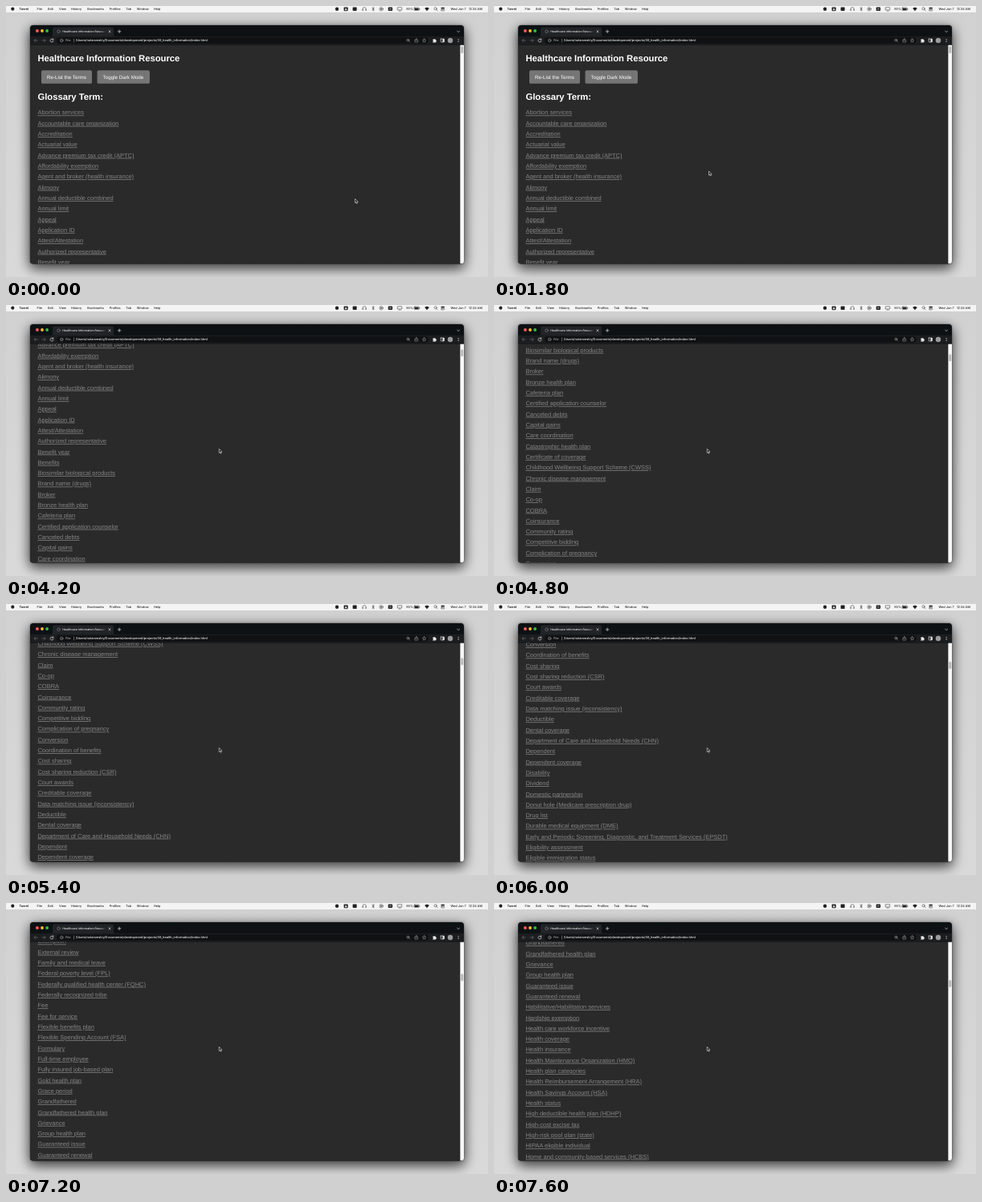
Animation of 600 by 338 pixels, one loop 8000 ms. Source, as an HTML page:

```html
<!DOCTYPE html>
<html lang="en">
<head>
<meta charset="utf-8">
<title>Healthcare Information Resource</title>
<style>
  html, body { margin: 0; width: 100%; height: 100%; overflow: hidden; background: #d3d3d3; }
  svg { display: block; width: 100vw; height: 100vh; text-rendering: geometricPrecision; }
  .ui { font: 500 3.8px Inter, Roboto, sans-serif; }
  .page { font: 7.5px "Liberation Sans", Arial, sans-serif; }
  .page .heading { font-weight: bold; font-size: 11.25px; fill: #fff; }
  .page .button { font-size: 6.25px; fill: #fff; }
  .term { fill: #858585; text-decoration: underline; }
  .line { fill: none; stroke-width: .7; stroke-linecap: round; stroke-linejoin: round; }
</style>
</head>
<body>
<svg viewBox="0 0 600 338" xmlns="http://www.w3.org/2000/svg">
  <defs>
    <linearGradient id="wall" x2="0" y2="1">
      <stop stop-color="#d1d1d1"/><stop offset="1" stop-color="#d9d9d9"/>
    </linearGradient>
    <linearGradient id="fade" gradientUnits="userSpaceOnUse" x1="116" x2="125">
      <stop stop-color="#e6e6e6"/><stop offset="1" stop-color="#e6e6e6" stop-opacity="0"/>
    </linearGradient>
    <clipPath id="view"><path d="M30 48.5H570V318a3.5 3.5 0 0 1-3.5 3.5H33.5A3.5 3.5 0 0 1 30 318Z"/></clipPath>
    <clipPath id="titleClip"><rect x="69" y="26" width="56" height="11"/></clipPath>
  </defs>

  <rect width="600" height="338" fill="url(#wall)"/>
  <rect width="600" height="8" fill="#f4f4f4"/>
  <g id="menu" class="ui" fill="#222">
    <circle cx="8.3" cy="3.7" r="2.1"/>
  </g>
  <g fill="#222">
    <circle cx="412" cy="3.8" r="2.2"/>
    <rect x="420.6" y="1.4" width="5" height="4.8" rx=".8"/>
    <path d="M423.1 2.3l1.4 3h-2.8z" fill="#f4f4f4"/>
    <rect x="431.6" y="1.6" width="5" height="4.3" rx=".6"/>
    <rect x="475.7" y="1.6" width="5.4" height="4.3" rx="1"/>
    <path d="M477 3.8h2.8" stroke="#f4f4f4" stroke-width=".7"/>
    <path d="M466.4 2.6l2 1.2-2 1.2z"/>
    <rect x="508.6" y="2.7" width="5" height="2.2" rx=".4"/>
    <path d="M521.2 2.9q2.8-2.3 5.6 0l-2.8 3.3z"/>
    <rect x="541.4" y="1.7" width="4.6" height="1.8" rx=".9"/>
  </g>
  <g class="line" stroke="#222" style="stroke-width:.5">
    <path d="M444 5.3v-1.5a2.1 2.1 0 0 1 4.2 0v1.5M444.2 4.3v1.4M448 4.3v1.4"/>
    <path d="M455.9 2.6l2.4 2.3-1.2 1.2v-4.6l1.2 1.2-2.4 2.3"/>
    <circle cx="467.1" cy="3.8" r="2.2"/>
    <path d="M487.7 1.8h5v3.2h-5zM489.2 6.2h2"/>
    <rect x="508" y="2.1" width="6.3" height="3.4" rx=".8"/><path d="M515 3.4v.8"/>
    <circle cx="534.6" cy="3.3" r="1.6"/><path d="M535.8 4.5l1.5 1.5"/>
    <rect x="541.5" y="4.4" width="4.4" height="1.6" rx=".8"/>
  </g>

  <rect x="30" y="24" width="540" height="297.5" rx="4" fill="#0d1114" style="filter:drop-shadow(0 5px 8px #0009) drop-shadow(0 0 1px #0008)"/>
  <path d="M56 38q2 0 2-2v-7.5q0-2 2-2h72q2 0 2 2V36q0 2 2 2z" fill="#212427"/>
  <rect x="30" y="37.8" width="540" height="10.7" fill="#1b1d1f"/>
  <rect x="63" y="39.3" width="463" height="7.6" rx="3.8" fill="#0f1112"/>
  <circle cx="38.9" cy="31" r="1.9" fill="#fe5f57"/>
  <circle cx="45" cy="31" r="1.9" fill="#febc2e"/>
  <circle cx="51.1" cy="31" r="1.9" fill="#28c840"/>
  <g class="line" stroke="#d8d8d8">
    <circle cx="65.5" cy="31.8" r="1.8" stroke="#777"/>
    <path d="M127.9 30.7l2.2 2.2m0-2.2l-2.2 2.2M139.3 31.8h3.6m-1.8-1.8v3.6M561.7 31.3l1.4 1.3 1.4-1.3"/>
    <path d="M39.3 43h-4.2m1.8-1.8L35.1 43l1.8 1.8M45 43h4.2m-1.8-1.8l1.8 1.8-1.8 1.8" stroke="#686868"/>
    <path d="M58.6 41.8a2 2 0 1 0 .4 1.8M58.9 40.8v1.3h-1.3"/>
    <g stroke="#aaa" style="stroke-width:.5">
      <circle cx="69.2" cy="43" r="1.8"/><path d="M69.2 43v.9m0-1.9v0M84.5 41v4"/>
      <circle cx="500.4" cy="42.6" r="1.5"/><path d="M501.5 43.7l1.4 1.4M499.7 42.6h1.4"/>
      <path d="M509.8 42.4h-1v2.7h4v-2.7h-1M510.8 43.8v-3.2m-1 .9l1-.9 1 .9"/>
      <path d="M520.6 40.7l.7 1.5 1.6.2-1.2 1.1.3 1.6-1.4-.8-1.4.8.3-1.6-1.2-1.1 1.6-.2z"/>
    </g>
    <rect x="541.2" y="41" width="4.2" height="4" rx=".4"/>
  </g>
  <g fill="#e6e6e6">
    <path d="M531.2 41.8h1.2a.8.8 0 0 1 1.6 0h1.2v1.2a.8.8 0 0 1 0 1.6v.9h-4v-1a.8.8 0 0 0 0-1.6z"/>
    <rect x="543.5" y="41" width="2" height="4"/>
    <circle cx="553" cy="43" r="3.2" fill="#9b9b9b"/>
    <circle cx="563.1" cy="41.4" r=".5"/><circle cx="563.1" cy="43" r=".5"/><circle cx="563.1" cy="44.6" r=".5"/>
  </g>
  <g class="ui">
    <text x="70.2" y="33.2" font-size="3.6" style="font-size:3.6px" fill="url(#fade)" clip-path="url(#titleClip)">Healthcare Information Resource</text>
    <text x="74" y="44.4" fill="#aaa">File</text>
    <text x="86.8" y="44.4" fill="#f2f2f2" style="font-size:3.9px">/Users/nolanvestry/Documents/development/projects/09_health_information/index.html</text>
  </g>

  <g class="page" clip-path="url(#view)">
    <rect x="30" y="48.5" width="540" height="273" fill="#2a2a2a"/>
    <g id="content">
      <text class="heading" x="39.4" y="68.8">Healthcare Information Resource</text>
      <g fill="#757575">
        <rect x="44" y="80.3" width="63" height="16.5" rx="1.9"/>
        <rect x="113.5" y="80.3" width="65.4" height="16.5" rx="1.9"/>
      </g>
      <text class="button" x="51" y="90.9">Re-List the Terms</text>
      <text class="button" x="120.6" y="90.9">Toggle Dark Mode</text>
      <text class="heading" x="39.4" y="116.8">Glossary Term:</text>
    </g>
    <rect x="565.4" y="48.5" width="4.6" height="273" fill="#f8f8f8"/>
    <rect id="thumb" x="566.3" y="50" width="3" height="9" rx="1.5" fill="#b9b9b9"/>
  </g>
  <path id="cursor" d="M0 0v4.9l1.1-1 .8 1.8.9-.4-.8-1.7h1.5z" fill="#000" stroke="#fff" stroke-width=".6"/>
</svg>

<script>
const LOOP = 8000, STEP = 200, ROW = 13.316;

const terms = `Abortion services|Accountable care organization|Accreditation|Actuarial value
Advance premium tax credit (APTC)|Affordability exemption|Agent and broker (health insurance)|Alimony
Annual deductible combined|Annual limit|Appeal|Application ID|Attest/Attestation|Authorized representative
Benefit year|Benefits|Biosimilar biological products|Brand name (drugs)|Broker|Bronze health plan
Cafeteria plan|Certified application counselor|Canceled debts|Capital gains|Care coordination
Catastrophic health plan|Certificate of coverage|Childhood Wellbeing Support Scheme (CWSS)
Chronic disease management|Claim|Co-op|COBRA|Coinsurance|Community rating|Competitive bidding
Complication of pregnancy|Conversion|Coordination of benefits|Cost sharing|Cost sharing reduction (CSR)
Court awards|Creditable coverage|Data matching issue (inconsistency)|Deductible|Dental coverage
Department of Care and Household Needs (CHN)|Dependent|Dependent coverage|Disability|Dividend
Domestic partnership|Donut hole (Medicare prescription drug)|Drug list|Durable medical equipment (DME)
Early and Periodic Screening, Diagnostic, and Treatment Services (EPSDT)|Eligibility assessment
Eligible immigration status|Emergency medical condition|Emergency medical transportation
Emergency room care|Emergency services|Employer or union retiree plans
Employer shared responsibility payment (ESRP)|Essential health benefits|Exchange|Excluded services
Exclusive provider plan|Exemption|External review|Family and medical leave|Federal poverty level (FPL)
Federally qualified health center (FQHC)|Federally recognized tribe|Fee|Fee for service
Flexible benefits plan|Flexible Spending Account (FSA)|Formulary|Full-time employee
Fully insured job-based plan|Gold health plan|Grace period|Grandfathered|Grandfathered health plan
Grievance|Group health plan|Guaranteed issue|Guaranteed renewal|Habilitative/Habilitation services
Hardship exemption|Health care workforce incentive|Health coverage|Health insurance
Health Maintenance Organization (HMO)|Health plan categories|Health Reimbursement Arrangement (HRA)
Health Savings Account (HSA)|Health status|High deductible health plan (HDHP)|High-cost excise tax
High-risk pool plan (state)|HIPAA eligible individual|Home and community-based services (HCBS)`.split(/[|\n]/);

const menuItems = [["File", 38.5], ["Edit", 52], ["View", 66], ["History", 81], ["Bookmarks", 101.3],
  ["Profiles", 128.8], ["Tab", 149.3], ["Window", 162.8], ["Help", 184],
  ["90%", 498.2], ["Wed Jun 7", 553.5], ["12:24 AM", 576]];

const byId = id => document.getElementById(id);

function addText(parent, text, x, y, attributes = {}) {
  const node = document.createElementNS("http://www.w3.org/2000/svg", "text");
  Object.entries({ x, y, ...attributes }).forEach(([key, value]) => node.setAttribute(key, value));
  node.textContent = text;
  parent.append(node);
}

addText(byId("menu"), "Tavrel", 16.5, 5.1, { "font-weight": 700, style: "font-weight:700" });
menuItems.forEach(([label, x]) => addText(byId("menu"), label, x, 5.1));
terms.forEach((term, i) => addText(byId("content"), term, 39.4, 135.4 + i * ROW, { class: "term" }));

// Key points: time, then values; linear in between.
const cursorPath = [[1200, 434.6, 240.6], [1400, 404, 235], [1600, 327, 219], [1800, 267.5, 206.1],
  [2000, 243, 190], [2200, 232, 178.5], [2400, 229.3, 174.8], [2600, 229, 174.5],
  [3400, 229, 174.5], [3800, 265.3, 179.5]];
const scrollPath = [[3600, 0], [3800, 22], [4200, 136.3], [5400, 443], [6600, 680.3], [7600, 1175]];

function valueAt(path, time) {
  if (time <= path[0][0]) return path[0].slice(1);
  const next = path.findIndex(point => point[0] >= time);
  if (next < 0) return path.at(-1).slice(1);
  const a = path[next - 1], b = path[next];
  const share = (time - a[0]) / (b[0] - a[0]);
  return a.slice(1).map((value, i) => value + (b[i + 1] - value) * share);
}

function draw() {
  const time = Math.floor(performance.now() % LOOP / STEP) * STEP;
  const [scroll] = valueAt(scrollPath, time);
  byId("content").setAttribute("transform", `translate(0 ${-scroll})`);
  byId("thumb").setAttribute("y", 50 + scroll * 0.0392);
  byId("cursor").setAttribute("transform", `translate(${valueAt(cursorPath, time)})`);
  requestAnimationFrame(draw);
}
draw();
</script>
</body>
</html>
```
